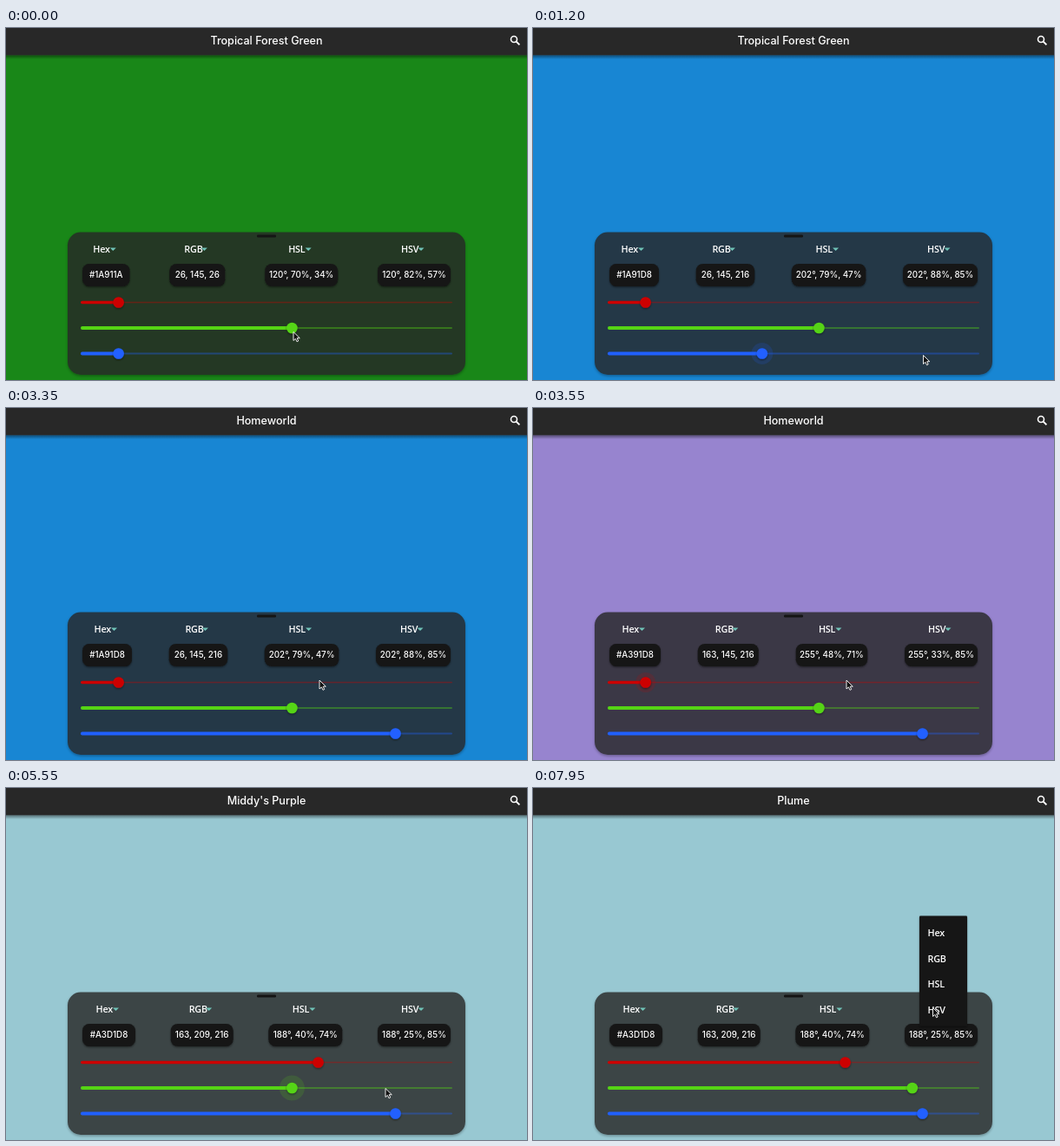
Recreate the animation shown at these times as an HTML page. Size 600 px wide and 406 px high, loop 8000 ms.

```html
<!DOCTYPE html>
<html lang="en">
<head>
<meta charset="utf-8">
<title>Color mixer</title>
<style>
  html, body { margin: 0; width: 100%; height: 100%; overflow: hidden; background: #282828; }
  svg { display: block; width: 100vw; height: 100vh; }
  text { fill: #fff; dominant-baseline: alphabetic; }
  .title { font: 500 12.6px Inter, sans-serif; text-anchor: middle; }
  .value { font: 500 9.8px Inter, sans-serif; text-anchor: middle; }
  .label { font: 600 10.8px "Open Sans", "Noto Sans", sans-serif; font-stretch: 75%; letter-spacing: -.2px; }
</style>
</head>
<body>
<svg id="stage" viewBox="0 0 600 406">
  <defs>
    <linearGradient id="fade" x1="0" y1="0" x2="0" y2="1">
      <stop offset="0" stop-opacity=".42"/>
      <stop offset="1" stop-opacity="0"/>
    </linearGradient>
    <filter id="soft" x="-20%" y="-20%" width="140%" height="150%">
      <feDropShadow dx="0" dy="1.2" stdDeviation="1.3" flood-opacity=".45"/>
    </filter>
    <filter id="blur" x="-10%" y="-10%" width="120%" height="120%">
      <feGaussianBlur stdDeviation="1.6"/>
    </filter>
  </defs>
</svg>
<script>
const LOOP = 8000, LEFT = 86, SPAN = 428;
const stage = document.getElementById('stage');

function add(tag, attrs, parent = stage) {
  const node = document.createElementNS('http://www.w3.org/2000/svg', tag);
  set(node, attrs);
  parent.appendChild(node);
  return node;
}
function set(node, attrs) {
  for (const key in attrs) node.setAttribute(key, attrs[key]);
}
const clamp = x => Math.max(0, Math.min(1, x));
const ramp = (t, from, length) => clamp((t - from) / length);
const smooth = x => x * x * (3 - 2 * x);
const mix = (a, b, k) => a + (b - a) * k;

// Each pick: click time, channel values, shown colour, chip widths, name and when it appears
const picks = [
  { at: 0, rgb: [26, 145, 26], fill: '#198718', widths: [54.5, 64, 84, 84], name: 'Tropical Forest Green', named: 0 },
  { at: 1156, rgb: [26, 145, 216], fill: '#1886d3', widths: [57, 67.5, 85.5, 86], name: 'Homeworld', named: 1300 },
  { at: 3550, rgb: [163, 145, 216], fill: '#9784cf', widths: [59, 70, 82.5, 84], name: "Middy's Purple", named: 3700 },
  { at: 5550, rgb: [163, 209, 216], fill: '#98c8d2', widths: [61, 72, 85, 84], name: 'Plume', named: 5700 }
];
const tracks = [
  { y: 316.5, color: '#cc0000', halo: 11.5, hover: 3330, leave: 4050, thick: 3.6, thin: 1.6 },
  { y: 346, color: '#55d414', halo: 14.5, hover: 4380, leave: 6050, thick: 3.8, thin: 2.2 },
  { y: 375.5, color: '#2060ff', halo: 12.5, hover: 700, leave: 1656, thick: 3.8, thin: 2.2 }
];
const pointer = [
  [0, 331, 350.5], [200, 331, 350.5], [900, 449.5, 377.5], [2650, 449.5, 377.5],
  [3350, 361, 314], [4250, 361, 314], [4550, 389, 343.5], [5050, 437, 346.5],
  [6100, 437, 346.5], [6750, 460.5, 253.5]
];
const modes = ['Hex', 'RGB', 'HSL', 'HSV'];
const MENU_AT = 7000;

function formats([r, g, b]) {
  const max = Math.max(r, g, b), min = Math.min(r, g, b), d = max - min, sum = max + min;
  const sector = max === r ? (g - b) / d + 6 : max === g ? (b - r) / d + 2 : (r - g) / d + 4;
  const hue = Math.round(sector * 60) % 360;
  const pct = x => Math.round(x * 100) + '%';
  const light = sum / 510;
  const hex = '#' + [r, g, b].map(v => v.toString(16).padStart(2, '0')).join('').toUpperCase();
  return [
    hex,
    `${r}, ${g}, ${b}`,
    `${hue}°, ${pct(d / (255 - Math.abs(sum - 255)))}, ${pct(light)}`,
    `${hue}°, ${pct(d / max)}, ${pct(max / 255)}`
  ];
}

const back = add('rect', { width: 600, height: 406 });
add('rect', { y: 31.5, width: 600, height: 4.5, fill: 'url(#fade)' });
add('rect', { width: 600, height: 31.5, fill: '#282828' });
const title = add('text', { class: 'title', x: 300, y: 19 });
const search = add('g', { fill: 'none', stroke: '#fff' });
add('circle', { cx: 585, cy: 13, r: 3.5, 'stroke-width': 1.6 }, search);
add('path', { d: 'M587.6 15.6L591.4 19.4', 'stroke-width': 2 }, search);

const panel = { x: 71, y: 235.5, width: 458, height: 164.5, rx: 15 };
add('rect', { ...panel, y: 237, fill: '#000', opacity: .3, filter: 'url(#blur)' });
const cover = add('rect', panel);
add('rect', { ...panel, fill: '#272727', 'fill-opacity': .81 });
add('rect', { x: 289, y: 238.6, width: 22, height: 2.8, rx: 1.2, fill: '#151515' });

const columns = modes.map(mode => {
  const label = add('text', { class: 'label', y: 259.3 });
  label.textContent = mode;
  return {
    label,
    arrow: add('path', { d: 'M-3.5 -1.7H3.5L0 1.8Z', fill: '#70c4b8' }),
    chip: add('rect', { y: 272, height: 26, rx: 8, fill: '#161616', filter: 'url(#soft)' }),
    value: add('text', { class: 'value', y: 288.4 })
  };
});

for (const track of tracks) {
  const { y, color, thick, thin } = track;
  add('rect', { x: LEFT, y: y - thin / 2, width: SPAN, height: thin, rx: thin / 2, fill: color, opacity: .38 });
  track.bar = add('rect', { x: LEFT, y: y - thick / 2, height: thick, rx: thick / 2, fill: color });
  track.glow = add('circle', { cy: y, fill: color, opacity: .16 });
  track.thumb = add('circle', { cy: y, r: 6.3, fill: color, filter: 'url(#soft)' });
}

const menu = add('g', {});
const sheet = add('rect', { x: 445, width: 55, rx: 1, fill: '#151515', filter: 'url(#soft)' }, menu);
const items = modes.map((mode, i) => {
  const item = add('text', { class: 'label', x: 454.5, y: 171.3 + i * 29.4 }, menu);
  item.textContent = mode;
  return item;
});

const cursor = add('path', {
  d: 'M0 0V10L2.4 7.9L4 11.3L5.7 10.5L4.2 7.2H7.3Z',
  fill: '#111', stroke: '#fff', 'stroke-width': .9, 'stroke-linejoin': 'round'
});

function showPick(pick) {
  set(back, { fill: pick.fill });
  set(cover, { fill: pick.fill });
  const texts = formats(pick.rgb);
  const gap = (424 - pick.widths.reduce((a, b) => a + b)) / 3;
  let x = 88;
  columns.forEach((col, i) => {
    const width = pick.widths[i], mid = x + width / 2;
    set(col.label, { x: mid - 15 });
    set(col.arrow, { transform: `translate(${mid + 8} 255.3)` });
    set(col.chip, { x, width });
    set(col.value, { x: mid });
    col.value.textContent = texts[i];
    x += width + gap;
  });
}

function showTracks(t, pick, before) {
  tracks.forEach((track, i) => {
    const from = before.rgb[i] / 255, to = pick.rgb[i] / 255;
    // Shorter travel takes longer
    const k = from === to ? 1 : smooth(ramp(t, pick.at, 75 / Math.abs(to - from)));
    const x = LEFT + SPAN * mix(from, to, k);
    const halo = ramp(t, track.hover, 100) - ramp(t, track.leave, 100);
    set(track.bar, { width: x - LEFT });
    set(track.thumb, { cx: x });
    set(track.glow, { cx: x, r: track.halo * smooth(halo) });
  });
}

function showMenu(t) {
  const p = ramp(t, MENU_AT, 300);
  const open = smooth(ramp(p, .25, .25));
  const top = mix(241, 147.5, open), bottom = mix(270, 274.5, open);
  set(menu, { opacity: ramp(p, 0, .25) });
  set(sheet, { y: top, height: bottom - top });
  const unit = .5 / (items.length + 1.5);
  items.forEach((item, i) => {
    set(item, { opacity: i === 3 ? 1 : ramp(p, .5 + (i + 1) * unit, 1.5 * unit) });
  });
}

function showCursor(t) {
  let i = 0;
  while (i < pointer.length - 2 && t >= pointer[i + 1][0]) i++;
  const [t0, x0, y0] = pointer[i], [t1, x1, y1] = pointer[i + 1];
  const k = smooth(ramp(t, t0, t1 - t0));
  set(cursor, { transform: `translate(${mix(x0, x1, k)} ${mix(y0, y1, k)})` });
}

function draw(t) {
  const n = picks.filter(pick => t >= pick.at).length - 1;
  showPick(picks[n]);
  showTracks(t, picks[n], picks[Math.max(0, n - 1)]);
  title.textContent = picks.filter(pick => t >= pick.named).pop().name;
  showMenu(t);
  showCursor(t);
}

const start = performance.now();
function tick() {
  draw((performance.now() - start) % LOOP);
  requestAnimationFrame(tick);
}
tick();
</script>
</body>
</html>
```
